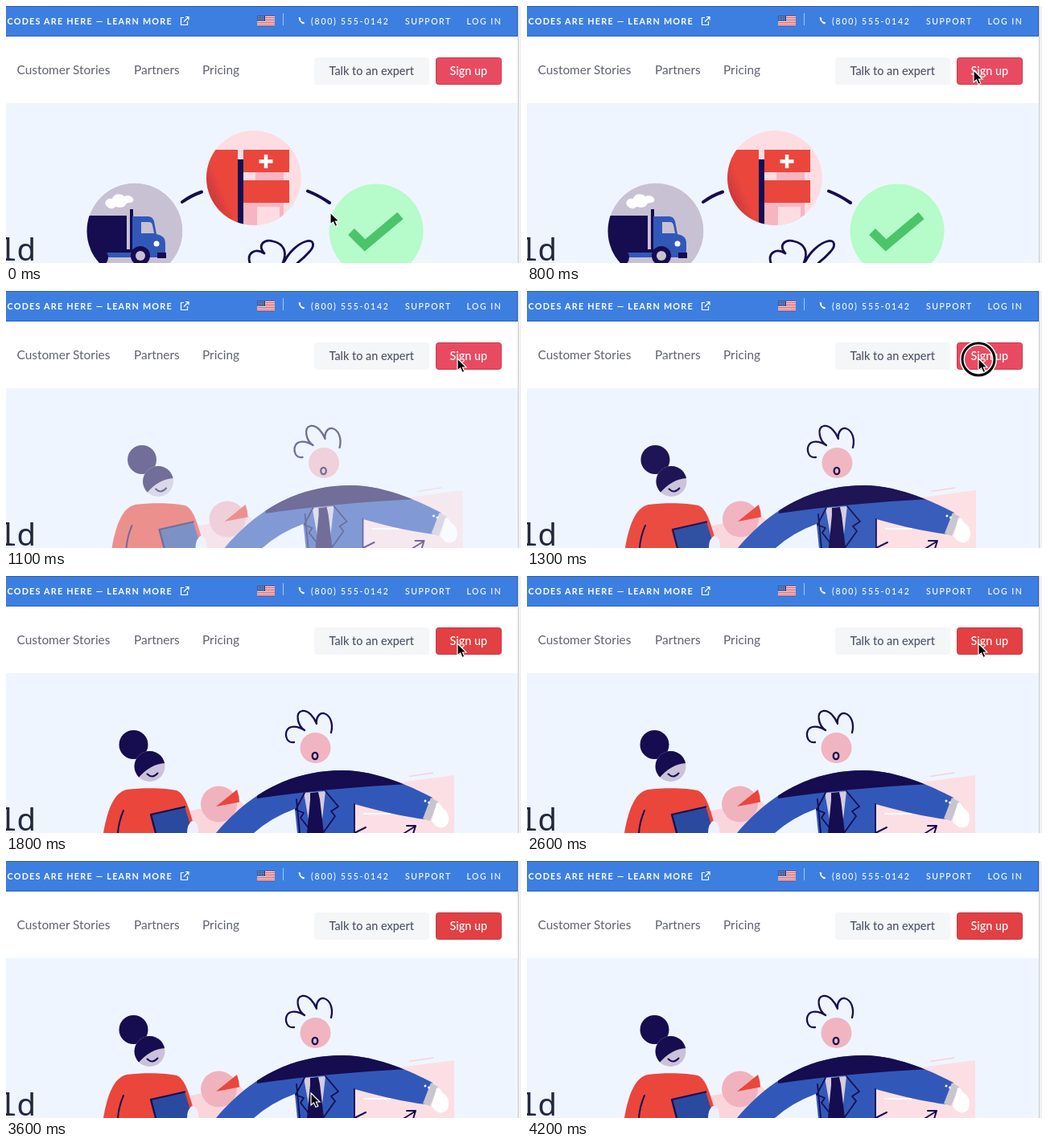
Write an HTML page that moves like this. It is 640 px wide and 320 px high and loops after 4.3 s.

```html
<!DOCTYPE html>
<html lang="en">
<head>
<meta charset="utf-8">
<title>Sign up</title>
<style>
  html, body { margin: 0; width: 100%; height: 100%; overflow: hidden; background: #fff; }
  svg { display: block; width: 100%; height: 100%; }
  text { font-family: Lato, "Open Sans", sans-serif; }
  .top { fill: #fff; font-size: 10.5px; font-weight: 500; letter-spacing: 1.5px; }
  .promo { font-size: 10.8px; font-weight: 700; letter-spacing: 1.22px; }
  .phone { letter-spacing: 1.75px; }
  .nav { fill: #60636f; font-size: 15.4px; }
  .btn { fill: #4d5368; font-size: 14.4px; font-weight: 500; }
  .headline { fill: #25273f; font: 500 39px "Noto Sans Mono", monospace; }
  .ink { fill: none; stroke: #160c50; stroke-width: 2.3; stroke-linecap: round; stroke-linejoin: round; }
  .navy { fill: #160c50; }
  .blue { fill: #3158b9; }
  .red { fill: #ea463c; }
</style>
</head>
<body>
<svg viewBox="0 0 640 320">
  <defs>
    <clipPath id="shopClip"><circle cx="308" cy="214" r="59"/></clipPath>
    <clipPath id="truckClip"><circle cx="160" cy="280" r="59.5"/></clipPath>
    <clipPath id="faceClip"><circle cx="178.500" cy="237" r="19"/></clipPath>
    <path id="jacket" d="M261 320C300 274 350 242 418 242C455 242 496 258 530 276L521 303C490 299 461 292 433 284V320H362L359 290Q329 301 308 320Z"/>
    <clipPath id="jacketClip"><use href="#jacket"/></clipPath>
    <linearGradient id="wall" x1="0" y1="1" x2="1" y2="0">
      <stop offset="0" stop-color="#a92b3c"/><stop offset=".5" stop-color="#ea463c"/>
    </linearGradient>
  </defs>

  <rect width="640" height="320" fill="#fff"/>
  <rect y="121" width="636" height="199" fill="#eff5fe"/>
  <text class="headline" x="-10" y="317">ld</text>

  <g id="delivery">
    <g clip-path="url(#shopClip)">
      <circle cx="308" cy="214" r="59" fill="#fddde2"/>
      <rect x="248" y="179" width="40" height="95" fill="url(#wall)"/>
      <rect class="navy" x="288" y="191" width="7.500" height="82"/>
      <rect x="295" y="207" width="50" height="66" fill="#f7b5c1"/>
      <rect x="295" y="207" width="15" height="10" fill="#fddde2"/>
      <rect x="312" y="250" width="28" height="24" fill="#fddde2"/>
      <path class="red" d="M295 179h57v28h-57zM295 217h57v28h-57z"/>
      <path d="M323 185v17M314.500 193.500h17" stroke="#fff" stroke-width="4.500"/>
    </g>
    <path class="ink" style="stroke-width:4" d="M219 244Q230 236 243 231.500M375 230.500Q389 236 402 245"/>
    <g clip-path="url(#truckClip)">
      <circle cx="160" cy="280" r="59.500" fill="#c8c1d4"/>
      <path d="M126 250C120 246 125 238 132 240C134 233 143 233 147 237C152 234 160 238 158 243C156 246 151 244 149 247C146 253 139 250 136 250C132 254 128 252 126 250Z" fill="#fff"/>
      <path class="navy" d="M100 261h50v43h-50zM154 253h4v52h-4z"/>
      <path class="blue" d="M157 262h20Q182 262 184 268L187 284Q198 286 198 295V313H100V304H157Z"/>
      <path d="M168 269h10q3 0 4 4l2 10h-16z" fill="#c8c1d4"/>
      <path class="navy" d="M100 303h60v4h-60zM188 307h11v7h-11z"/>
      <circle class="navy" cx="167" cy="311" r="12"/>
      <circle cx="167" cy="311" r="6" fill="#c8c1d4"/>
      <circle class="navy" cx="116" cy="313" r="11"/>
      <circle cx="187" cy="296" r="3.500" fill="#fff"/>
    </g>
    <circle cx="460" cy="280" r="58.500" fill="#b6fbca"/>
    <path d="M429 281L446 298L490 261" fill="none" stroke="#4cc46a" stroke-width="11"/>
    <path class="ink" style="stroke-width:2.8" d="M303 320C299 307 310 301 321 308C312 297 321 290 332 293C345 296 350 306 344 320M346 318C352 306 363 296 373 293C383 290 384 299 377 306Q370 314 362 320"/>
  </g>

  <g id="team">
    <path d="M226 293L290 279L300 290L262 320H226Z" fill="#fbd5dc"/>
    <path d="M430 265L557 248V320H430Z" fill="#fcdfe4"/>
    <path d="M501 249.500L531 245" stroke="#f9cfd8" stroke-width="1.500"/>
    <path d="M444 296H478M455 289L468 288" stroke="#fff" stroke-width="2"/>
    <path class="ink" style="stroke-width:2" d="M433 320L447 313M484 327L508 312M498 311L509 311L506 321"/>

    <circle cx="264.500" cy="284" r="22.500" fill="#f0b3be"/>
    <path class="red" d="M261 287L287 266Q290 274 290 281.500Z"/>

    <circle class="navy" cx="158.500" cy="210" r="18"/>
    <circle cx="178.500" cy="237" r="19" fill="#cbc2d9"/>
    <path class="navy" clip-path="url(#faceClip)" d="M157 215H200V233Q180 233 164 252H157Z"/>
    <path class="ink" style="stroke-width:2" d="M175.500 246.500Q182 253 188.500 245.500"/>
    <path class="red" d="M121 320C126 293 133 270 150 266C172 263 200 264 212 267C223 271 228 291 236 320Z"/>
    <path class="ink" style="stroke-width:2" d="M146 292Q140 306 139 320"/>
    <path d="M180 297L222 287L232 320H186Z" fill="#294a9f"/>
    <path class="ink" d="M180 297L222 287.500M180 297L186 320"/>
    <path d="M225 320Q225 309 231 305Q240 306 239 320Z" fill="#eef0fb"/>

    <use class="blue" href="#jacket"/>
    <path class="navy" clip-path="url(#jacketClip)" d="M312 277V230H500V259Q400 264 312 277Z"/>
    <path d="M370 270L397 268L391 320H379Z" fill="#d4cce0"/>
    <path class="navy" d="M378 270L388 269L390 278L395 320H374L378 279Z"/>
    <path class="ink" style="stroke-width:1.800" d="M371 270L360 291L370 295L366 301L381 320M397 268L413 287L404 293L409 299L394 320M361 278L365 320M433 284V320"/>
    <path d="M528 276L537 281L527 305L518 302Z" fill="#c8c5cf"/>
    <path d="M535 283C540 281 540 287 544 290C551 294 552 306 547 311C541 316 534 313 529 305Z" fill="#fff"/>
    <g fill="#fff"><circle cx="521" cy="280" r="1.500"/><circle cx="525.500" cy="282" r="1.500"/></g>

    <circle cx="384.500" cy="214" r="19" fill="#f0b5c0"/>
    <ellipse class="ink" cx="384" cy="224" rx="3.300" ry="4.200"/>
    <path class="ink" d="M358 207C347 209 345 193 352 189C357 186 365 188 371 192C362 186 359 170 368 168C376 167 383 176 386 184C385 177 389 170 395 171C403 173 407 184 404 195"/>
  </g>

  <rect width="636" height="38" fill="#2c5fba"/>
  <rect y="1" width="635" height="36" fill="#3d7fe1"/>
  <text class="top promo" x="1.500" y="23">CODES ARE HERE — LEARN MORE</text>
  <path d="M221 14.500H217.500V23.500H225.500V19M223 13.500H227V17.500M227 13.500L221 19.500" fill="none" stroke="#fff" stroke-width="1.200"/>
  <g id="flag">
    <rect x="312" y="12" width="22" height="13" fill="#fff"/>
    <path d="M312 12.500h22m-22 2h22m-22 2h22m-22 2h22m-22 2h22m-22 2h22m-22 2h22" stroke="#c9404f"/>
    <rect x="312" y="12" width="10" height="7" fill="#35508f"/>
    <path d="M313 13.500h8M313 15.500h8M313 17.500h8" stroke="#b9c7e6" stroke-dasharray="1 1"/>
  </g>
  <path d="M344.500 9V24" stroke="#a6c5f5"/>
  <path d="M364.500 14.500Q364.500 20 370.500 21.500" fill="none" stroke="#fff" stroke-width="1.500"/>
  <path d="M363.500 14.500l2-.5 1 2.500-1.500 1zM368 19.500l3 1-1 2-2.500-1z" fill="#fff"/>
  <text class="top phone" x="379" y="23">(800) 555-0142</text>
  <text class="top" x="496" y="23">SUPPORT</text>
  <text class="top" x="572.500" y="23">LOG IN</text>

  <text class="nav" x="13.500" y="85">Customer Stories</text>
  <text class="nav" x="159" y="85">Partners</text>
  <text class="nav" x="244" y="85">Pricing</text>
  <rect x="383" y="64" width="143" height="34" rx="4" fill="#f5f6f8"/>
  <text class="btn" x="401.500" y="86">Talk to an expert</text>
  <rect id="signup" x="534.500" y="64.500" width="81" height="33" rx="3" stroke="#c8384a"/>
  <text class="btn" x="551.500" y="86" style="fill:#fff">Sign up</text>

  <rect x="636" width="4" height="320" fill="#f1f1f2"/>
  <rect x="636" width="1" height="320" fill="#c9cbd0"/>

  <g id="ring" fill="none">
    <circle cx="561" cy="85" r="20" stroke="#fff" stroke-width="6"/>
    <circle cx="561" cy="85" r="20" stroke="#000" stroke-width="3"/>
  </g>
  <path id="cursor" d="M0 0V15L3.500 12L6 17.500L8.800 16.300L6.400 11H11Z" fill="#000" stroke="#fff" stroke-width="1.200"/>
</svg>
<script>
  const LOOP = 4300, STEP = 100;
  const part = id => document.getElementById(id);
  const [delivery, team, signup, ring, cursor] =
    ["delivery", "team", "signup", "ring", "cursor"].map(part);

  const clamp = v => Math.min(1, Math.max(0, v));
  const smooth = p => p * p * (3 - 2 * p);
  const mix = (a, b, p) => a.map((v, i) => v + (b[i] - v) * p);
  const progress = (t, from, to) => clamp((t - from) / (to - from));
  const show = (el, visible) => el.setAttribute("visibility", visible ? "visible" : "hidden");

  // start, end, destination
  const moves = [
    [0, 800, [555, 80]],
    [800, 1100, [561, 84]],
    [2600, 3600, [379, 289]]
  ];

  function cursorAt(t) {
    return moves.reduce((pos, [from, to, goal]) =>
      mix(pos, goal, smooth(progress(t, from, to))), [403, 257]);
  }

  function draw(t) {
    delivery.setAttribute("opacity", 1 - progress(t, 800, 1000));

    const entered = t < 1000 ? 0 : 1 - (1 - progress(t, 980, 1460)) ** 3;
    team.setAttribute("opacity", entered);
    team.setAttribute("transform", `translate(${25 * (1 - entered)} 0)`);

    const rgb = mix([232, 75, 97], [226, 64, 67], progress(t, 1300, 1600));
    signup.setAttribute("fill", `rgb(${rgb.map(Math.round)})`);

    show(ring, t >= 1300 && t < 1500);
    show(cursor, t < 3700);
    cursor.setAttribute("transform", `translate(${cursorAt(t)})`);
  }

  const start = performance.now();
  function tick() {
    const t = (performance.now() - start) % LOOP;
    draw(Math.floor(t / STEP) * STEP);
    requestAnimationFrame(tick);
  }
  tick();
</script>
</body>
</html>
```
